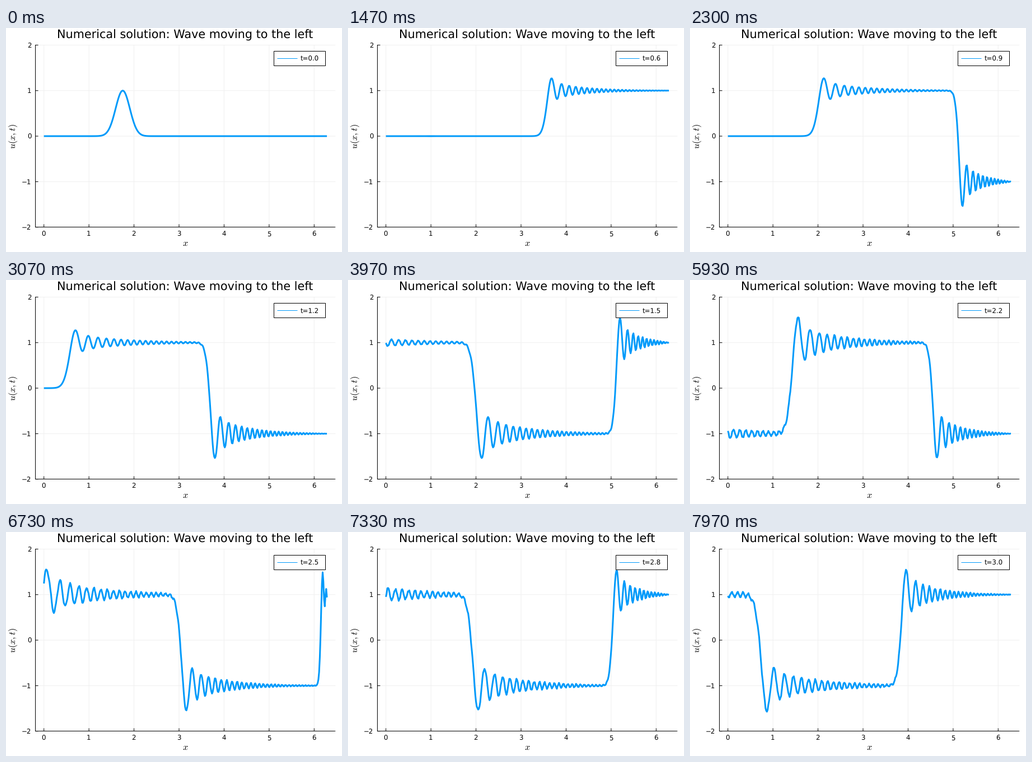
A matplotlib script for the animation above (8000 ms loop, 600 px wide and 400 px high).

```python
import numpy as np
import matplotlib.pyplot as plt
from matplotlib.animation import FuncAnimation
from matplotlib.patches import Rectangle

plt.rcParams["font.family"] = "DejaVu Sans"
plt.rcParams["mathtext.fontset"] = "cm"
plt.rcParams["text.hinting"] = "no_hinting"
plt.rcParams["path.simplify"] = False
plt.rcParams["path.snap"] = False

W, H = 600, 400
PX = 0.72                      # points per pixel at 100 dpi
LOOP_MS, TICK_MS = 8000, 20
STATES = 240                   # distinct pictures in one loop
BLUE = "#009AFA"

# Advection u_t = c u_x: central differences, weak inflow on the right,
# classic RK4 at a Courant number of one
C, N = 5.0, 400
X = np.linspace(0, 2 * np.pi, N)
DX = X[1] - X[0]
DT = DX / C
STEPS = 4                      # time steps per picture


def rate(u, t):
    du = np.empty_like(u)
    du[1:-1] = (u[2:] - u[:-2]) / 2
    du[0] = u[1] - u[0]
    inflow = np.sign(np.sin(C * t))
    du[-1] = u[-1] - u[-2] - 2 * (u[-1] - inflow)
    return du * C / DX


def rk4(u, t):
    k1 = rate(u, t)
    k2 = rate(u + DT / 2 * k1, t + DT / 2)
    k3 = rate(u + DT / 2 * k2, t + DT / 2)
    k4 = rate(u + DT * k3, t + DT)
    return u + DT / 6 * (k1 + 2 * k2 + 2 * k3 + k4)


def solve():
    u = np.exp(-20 * (X - 1.75) ** 2)
    states = [u]
    for step in range((STATES - 1) * STEPS):
        u = rk4(u, step * DT)
        if (step + 1) % STEPS == 0:
            states.append(u)
    return states


def px(x):
    return 67.7 + 80.43 * np.asarray(x)


def py(y):
    return 193.1 - 81.3 * np.asarray(y)


states = solve()

fig = plt.figure(figsize=(W / 100, H / 100), dpi=100, facecolor="white")
ax = fig.add_axes([0, 0, 1, 1])
ax.set_xlim(0, W)
ax.set_ylim(H, 0)
ax.axis("off")

LEFT, RIGHT, TOP, BOTTOM = 52.5, 588.2, 30.5, 355.5


def seg(x0, y0, x1, y1, color="black", width=1.0, z=2):
    ax.plot([x0, x1], [y0, y1], color=color, lw=width * PX, zorder=z,
            solid_capstyle="butt")


def label(x, y, s, size, **kw):
    return ax.text(x, y, s, fontsize=size * PX, color="black", zorder=6, **kw)


for v in range(7):
    x = float(px(v))
    seg(x, TOP, x, BOTTOM, "#F0F0F0", z=1)
    seg(x, BOTTOM, x, BOTTOM - 5)
    label(x - 0.4, 371.4, str(v), 11.8, ha="center", va="baseline")
for v in range(-2, 3):
    y = float(py(v))
    seg(LEFT, y, RIGHT, y, "#F0F0F0", z=1)
    seg(LEFT, y, LEFT + 5, y)
    label(45.3, y + 4.3, str(v).replace("-", "\u2212"), 11.8,
          ha="right", va="baseline")
seg(LEFT, TOP - 0.5, LEFT, BOTTOM + 0.5)
seg(LEFT - 0.5, BOTTOM, RIGHT, BOTTOM)

label(319.8, 18.7, "Numerical solution: Wave moving to the left", 20.8,
      ha="center", va="baseline")
label(320, 389, "$x$", 16.3, ha="center", va="baseline")
label(13, 194, "$u(x,t)$", 16.3, ha="center", va="center", rotation=90)

curve, = ax.plot([], [], color=BLUE, lw=3 * PX, zorder=3,
                 solid_capstyle="butt", solid_joinstyle="round")

ax.add_patch(Rectangle((478.5, 41.5), 92, 26, facecolor="white",
                       edgecolor="black", lw=PX, zorder=4))
seg(484.5, 54.5, 520.5, 54.5, BLUE, z=5)
clock = label(525.8, 59, "", 11.8, ha="left", va="baseline")


def draw(tick):
    # pictures change every 100/3 ms, rounded to 10 ms
    ms = (tick + 0.5) * TICK_MS
    i = int((ms + 4) * STATES / LOOP_MS)
    curve.set_data(px(X), py(states[i]))
    clock.set_text(f"t={i * STEPS * DT:.1f}")
    return curve, clock


anim = FuncAnimation(fig, draw, frames=LOOP_MS // TICK_MS, interval=TICK_MS,
                     repeat=True, repeat_delay=0, blit=False)
plt.show()
```
